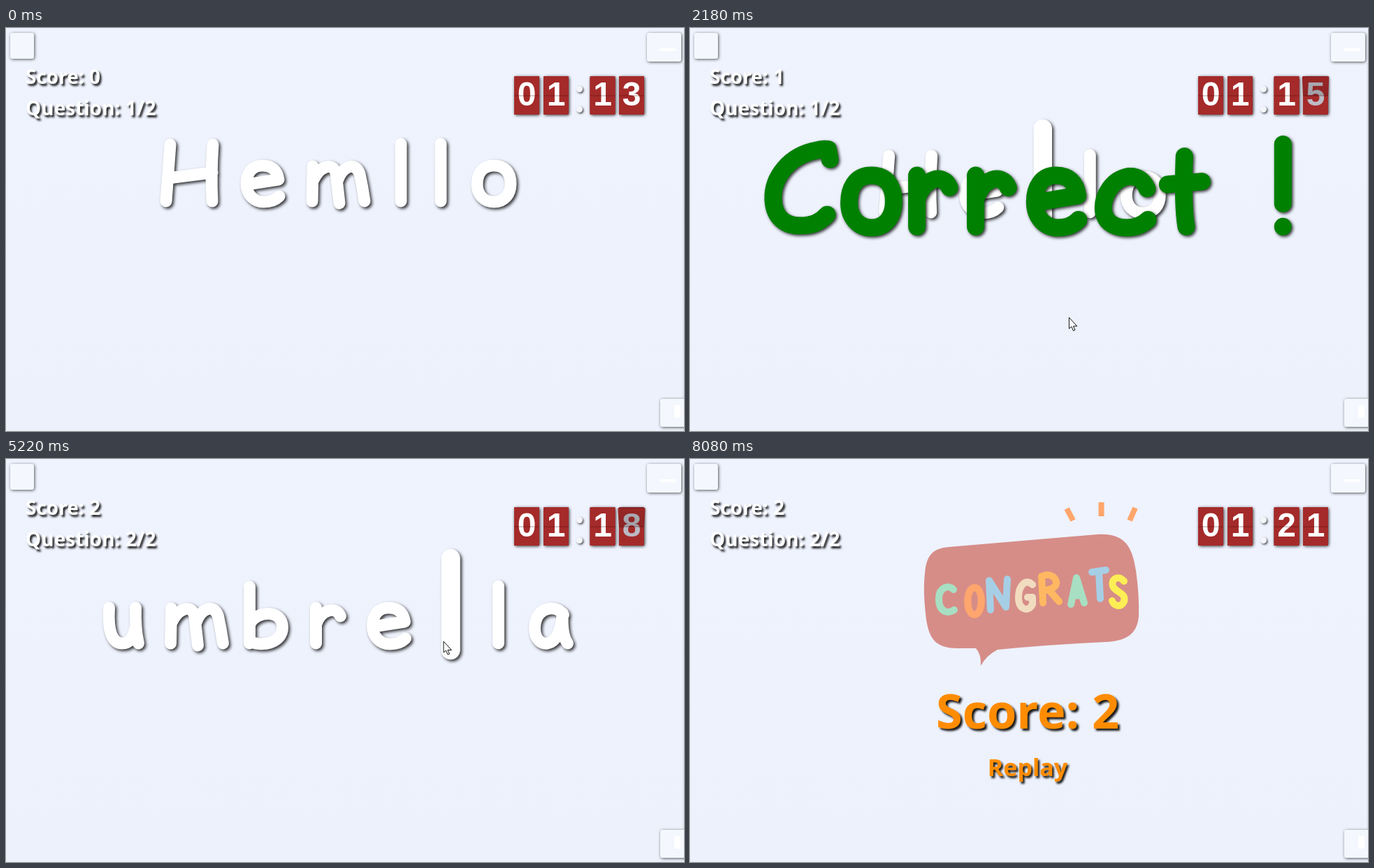
Animation, 970 px wide and 577 px high, one loop 8.25 s. Source, as an HTML page with a canvas:

```html
<!DOCTYPE html>
<html lang="en">
<head>
<meta charset="utf-8">
<title>Spelling game</title>
<style>
html, body { margin: 0; width: 100%; height: 100%; overflow: hidden; background: #eef2fd; }
canvas { display: block; }
</style>
</head>
<body>
<canvas id="stage" width="970" height="577"></canvas>
<script>
const ctx = document.getElementById('stage').getContext('2d');
const LOOP = 8250, STEPS = 49, STEP = LOOP / STEPS;
const SANS = '"Open Sans", "Noto Sans", sans-serif';

// Handwritten letters: advance width and pen path, baseline at y = 0
const GLYPHS = {
  H: [118, 'M16-90L10-9M77-90Q74-45 76-9M13-42L76-50'],
  e: [89, 'M8-33L53-40Q50-60 30-60C14-60 7-48 7-34C7-18 18-8 32-8Q46-8 54-16'],
  m: [120, 'M13-59L12-9M13-38C22-58 40-66 46-50L51-6M48-38C56-60 74-66 80-48Q84-30 87-9'],
  l: [57, 'M19-91V-9'],
  o: [88, 'M38-60C20-60 14-46 14-33C14-18 24-8 38-8C54-8 62-20 62-34C62-50 54-60 38-60Z'],
  u: [85, 'M9-60Q6-9 28-9Q42-9 46-30M47-60Q46-30 51-9'],
  b: [92, 'M5-90V-9M6-38C16-56 52-58 52-32C52-8 20-4 5-12'],
  r: [82, 'M8-60V-9M8-36C14-56 36-64 43-48'],
  t: [72, 'M22-79Q20-30 24-9M4-51L41-54'],
  a: [86, 'M55-50Q48-60 36-59C20-57 14-44 14-30C14-14 24-8 32-9C48-12 52-34 54-52Q52-22 61-9'],
  C: [90, 'M70-76L68-86Q62-87 56-85C26-80 8-58 9-36C10-18 22-10 38-10C52-10 60-14 67-21'],
  c: [80, 'M54-47Q48-60 34-59C16-56 7-40 7-28C7-14 18-8 32-8Q46-8 55-16'],
  '!': [57, 'M19-91V-32M19-9.2V-9']
};

// Linear keyframes: [time, value, ...]
function track(keys, t) {
  let i = keys.findIndex(k => k[0] > t);
  if (i < 0) return keys.at(-1).slice(1);
  if (i === 0) return keys[0].slice(1);
  const a = keys[i - 1], b = keys[i], p = (t - a[0]) / (b[0] - a[0]);
  return a.slice(1).map((v, j) => v + (b[j + 1] - v) * p);
}

const WORDS = [
  { from: 0, text: 'Hemllo', grow: { 2: [[670, 1], [1000, 1.6]] } },
  { from: 1005, text: 'Hello', grow: {
    1: [[1000, 1], [1180, 1.6], [1515, 1.27], [1690, 1]],
    2: [[1515, 1], [1850, 1.6], [2190, 1.56], [2520, 1]] } },
  { from: 3530, text: 'umbretlla', grow: { 5: [[4540, 1], [4880, 1.6]] } },
  { from: 5045, text: 'umbrella', grow: {
    5: [[5040, 1.2], [5215, 1.6], [5560, 1.6], [5900, 1]] } }
];

const CURSOR = [
  [330, 632, 483], [670, 540, 330], [1000, 480, 215], [1515, 485, 304], [1850, 508, 255],
  [2190, 542, 415], [2690, 532, 428], [3704, 507.500, 406], [4200, 560, 425], [4880, 608, 228],
  [5215, 625.5, 260], [5900, 630, 424], [6398, 631, 423], [7070, 600, 440]
];

function shadow(size, blur, color) {
  ctx.shadowOffsetX = ctx.shadowOffsetY = size;
  ctx.shadowBlur = blur;
  ctx.shadowColor = color;
}

function glyph(ch, x, y, sx, sy, width, color) {
  const path = new Path2D();
  path.addPath(new Path2D(GLYPHS[ch][1]), new DOMMatrix([sx, 0, 0, sy, x, y]));
  ctx.lineWidth = width;
  ctx.strokeStyle = color;
  ctx.stroke(path);
}

function drawWord(t) {
  const { text, grow } = WORDS.findLast(w => t >= w.from);
  const letters = [...text].map((ch, i) => {
    const s = grow[i] ? track(grow[i], t)[0] : 1;
    return { ch, s, adv: GLYPHS[ch][0], extra: 22 * (s - 1) / .6 };
  });
  const total = letters.reduce((sum, l) => sum + l.adv + l.extra, 0);
  const top = Math.max(...letters.map(l => l.s));
  const base = 257 + 16 * Math.min(1, (top - 1) * 2.8);
  let x = 483.5 - total / 2;
  ctx.save();
  shadow(2.5, 4, 'rgba(0,0,0,.78)');
  for (const { ch, s, adv, extra } of letters) {
    const mid = adv / 2 - 9;
    glyph(ch, x + extra / 2 + mid * (1 - s), base + 15 * ((s - 1) / .6) ** 2, s, s, 17 * s, '#fff');
    x += adv + extra;
  }
  ctx.restore();
}

// Eased rise from below
const rise = (t, start, dist) => dist * (1 - Math.min(1, (t - start) / 320)) ** 2;

function drawCorrect(t, start) {
  const xs = [107, 209, 314, 398, 484, 582, 678, 823];
  const y = 297.5 + rise(t, start, 265);
  ctx.save();
  shadow(2, 4, 'rgba(0,0,0,.78)');
  [...'Correct!'].forEach((ch, i) => glyph(ch, xs[i], y, 1.33, 1.44, 25, '#008000'));
  ctx.restore();
}

function label(text, x, y, size, color, align = 'left') {
  ctx.save();
  shadow(size > 50 ? 3 : 2.5, 3, 'rgba(0,0,0,.9)');
  ctx.font = `bold ${size}px ${SANS}`;
  ctx.textAlign = align;
  ctx.fillStyle = color;
  ctx.fillText(text, x, y);
  ctx.restore();
}

function drawCongrats(t, start) {
  ctx.save();
  ctx.translate(0, rise(t, start, 290));
  ctx.fillStyle = '#d68d88';
  ctx.fill(new Path2D('M370 126L582 108C624 105 633 128 638 160Q643 195 642 225C640 252 622 261 594 262' +
    'Q510 266 440 273Q424 281 416 296Q417 280 409 271L382 271C350 271 342 255 338 230Q333 190 336 164C338 137 348 128 370 126Z'));
  const strokes = [
    ['#a8dfc3', 'M377 187C370 179 356 184 356 200C356 220 370 222 378 216'],
    ['#ffa56e', 'M407 184C394 185 394 223 407 223C420 222 420 184 407 184Z'],
    ['#a6cfe6', 'M430 216L428 174L452 212L454 172'],
    ['#f1dcc0', 'M490 180C480 170 470 182 470 198C470 216 484 220 490 208V198H483'],
    ['#ffb861', 'M505 206L503 168C520 160 530 178 520 184Q514 188 506 188M514 188L528 204'],
    ['#a8dfc3', 'M545 208L553 170L564 206M549 196L560 195'],
    ['#a6cfe6', 'M575 162L595 159M585 162L587 200'],
    ['#fdee55', 'M621 175C612 164 600 174 606 184C612 192 624 192 621 204C616 214 606 210 604 203']
  ];
  ctx.lineWidth = 10;
  for (const [color, d] of strokes) {
    ctx.strokeStyle = color;
    ctx.stroke(new Path2D(d));
  }
  ctx.lineCap = 'butt';
  ctx.lineWidth = 8;
  ctx.strokeStyle = '#ffa66c';
  ctx.stroke(new Path2D('M539 71L548 88M588.5 62V82M637 70L629 88'));
  label('Score: 2', 483, 386, 68.5, '#ff8c00', 'center');
  label('Replay', 483, 454, 34, '#ff8c00', 'center');
  ctx.restore();
}

// One half of a flip card; tilt runs from 1 (flat) to 0 (edge on)
function half(digit, x, top, tilt, shade, ink) {
  const flare = 3 * (1 - tilt * tilt) ** .25;
  const edge = top ? 97 - 28 * tilt : 97 + 27 * tilt;
  ctx.save();
  ctx.beginPath();
  ctx.moveTo(x, 97);
  ctx.lineTo(x - flare, edge);
  ctx.lineTo(x + 36 + flare, edge);
  ctx.lineTo(x + 36, 97);
  ctx.closePath();
  ctx.fillStyle = '#a52a2a';
  ctx.fill();
  ctx.clip();
  ctx.save();
  ctx.translate(x + 18, 97);
  ctx.scale(1 + flare * .02, tilt);
  ctx.fillStyle = ink;
  ctx.font = 'bold 48px "Liberation Sans", Arial, sans-serif';
  ctx.textAlign = 'center';
  ctx.fillText(digit, 0, 14);
  ctx.restore();
  if (shade > 0) {
    const g = ctx.createLinearGradient(0, 97, 0, top ? 69 : 124);
    g.addColorStop(0, `rgba(0,0,0,${shade})`);
    g.addColorStop(1, `rgba(0,0,0,${shade * .5})`);
    ctx.fillStyle = g;
    ctx.fill();
  }
  ctx.restore();
}

function card(x, from, to, angle) {
  ctx.save();
  shadow(1, 4, 'rgba(0,0,0,.8)');
  ctx.fillStyle = '#a52a2a';
  ctx.beginPath();
  ctx.roundRect(x, 69, 36, 55, 3);
  ctx.fill();
  ctx.restore();
  const moving = from !== to && angle < 180;
  if (moving) {
    const first = angle < 90, ink = first ? '#bcbbc4' : '#fff';
    const tilt = Math.abs(Math.cos(angle * Math.PI / 180));
    half(to, x, true, 1, .7 * (1 - angle / 140), ink);
    half(from, x, false, 1, first ? .85 * (angle / 90) ** 3 : .6, ink);
    half(first ? from : to, x, first, tilt, first ? .15 : .2 * (1 - angle / 180), first ? ink : '#f2eef0');
  } else {
    half(to, x, true, 1, 0, '#fff');
    half(to, x, false, 1, 0, '#fff');
  }
  ctx.fillStyle = 'rgba(60,0,0,.4)';
  ctx.fillRect(x, 96.5, 36, 1);
}

function drawClock(t) {
  const flips = Math.floor((t + 859) / 1000);
  const angle = Math.min(180, (t + 859) % 1000 * .221);
  const digits = n => '01' + n;
  const from = digits(12 + flips), to = digits(13 + flips);
  [727, 769, 835.5, 877].forEach((x, i) => card(x, from[i], to[i], angle));
  ctx.save();
  shadow(1.5, 3, 'rgba(0,0,0,.7)');
  ctx.fillStyle = '#f4f5fa';
  for (const y of [87.5, 116.5]) {
    ctx.beginPath();
    ctx.arc(820.5, y, 4.5, 0, 7);
    ctx.fill();
  }
  ctx.restore();
}

function button(x, y, w, h) {
  ctx.save();
  shadow(1, 4, 'rgba(0,0,0,.65)');
  ctx.fillStyle = '#f4f7fd';
  ctx.beginPath();
  ctx.roundRect(x, y, w, h, 3);
  ctx.fill();
  ctx.restore();
}

function drawBack() {
  const g = ctx.createLinearGradient(0, 0, 0, 577);
  g.addColorStop(0, '#eff3fe');
  g.addColorStop(1, '#ecf1fb');
  ctx.fillStyle = g;
  ctx.fillRect(0, 0, 970, 577);
  ctx.fillStyle = '#dfe3ed';
  ctx.fillRect(968, 50, 2, 480);
  button(6, 7, 34, 37);
  button(917, 7, 49, 41);
  button(936, 531, 40, 40);
  ctx.fillStyle = '#fff';
  ctx.fillRect(935, 29, 23, 4);
  ctx.fillRect(956, 540, 9, 18);
}

function drawCursor(t) {
  if (t < 330 || t > 7100) return;
  const [x, y] = track(CURSOR, t);
  ctx.save();
  ctx.translate(x, y);
  const arrow = new Path2D('M.5.5V16L4 13L6.5 19L9 18L6.5 12.5H11.5Z');
  ctx.fillStyle = '#fff';
  ctx.fill(arrow);
  ctx.lineWidth = 1;
  ctx.strokeStyle = '#111';
  ctx.stroke(arrow);
  ctx.restore();
}

function draw(t) {
  ctx.lineCap = ctx.lineJoin = 'round';
  drawBack();
  const score = t < 1005 ? 0 : t < 5045 ? 1 : 2;
  label('Score: ' + score, 28, 80, 28, '#fff');
  label(`Question: ${t < 3530 ? 1 : 2}/2`, 28, 125, 28, '#fff');
  drawClock(t);
  if (t < 7400) drawWord(t);
  if (t > 1845 && t < 3530) drawCorrect(t, 1845);
  if (t > 6055 && t < 7400) drawCorrect(t, 6055);
  if (t >= 7400) drawCongrats(t, 7400);
  drawCursor(t);
}

const begin = performance.now();
function tick() {
  const t = (performance.now() - begin) % LOOP;
  draw(Math.min(STEPS - 1, Math.floor((t + 9) / STEP)) * STEP);
  requestAnimationFrame(tick);
}
tick();
</script>
</body>
</html>
```
